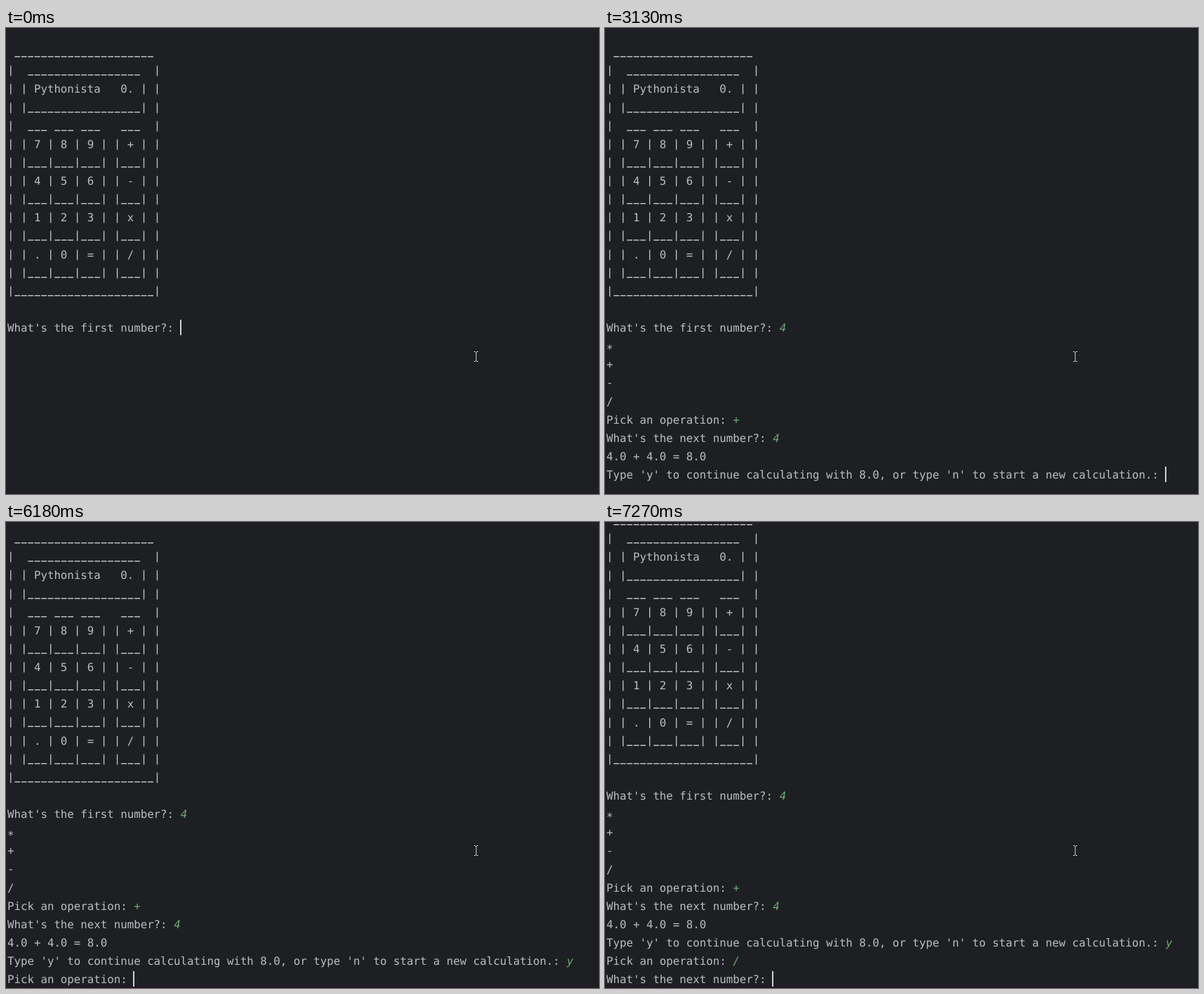
Animation of 845 by 663 pixels, one loop 8000 ms. Source, as an HTML page:

```html
<!DOCTYPE html>
<html lang="en">
<head>
<meta charset="utf-8">
<title>Console calculator</title>
<style>
  html, body { margin: 0; width: 100%; height: 100%; overflow: hidden; background: #1e1f22; }
  svg { display: block; width: 845px; height: 663px; }
  text {
    font: 15.76px "DejaVu Sans Mono", monospace;
    fill: #bcbec4;
    white-space: pre;
    text-rendering: geometricPrecision;
  }
  .typed { fill: #6aab73; font-style: italic; }
</style>
</head>
<body>
<svg viewBox="0 0 845 663">
  <rect width="845" height="663" fill="#1e1f22"/>
  <rect y="660" width="845" height="3" fill="#241a21"/>
  <g id="page"></g>
  <rect id="caret" width="2" height="22" fill="#ced0d6"/>
  <g fill="none">
    <path d="M666.5 460.5H669L670 461.5L671 460.5H673.5M670 461V474M666.5 474.5H669L670 473.5L671 474.5H673.5" stroke="#111214" stroke-width="2.6"/>
    <path d="M667 460.5H669L670 461.5L671 460.5H673M670 461V474M667 474.5H669L670 473.5L671 474.5H673" stroke="#e6e6e6"/>
  </g>
</svg>
<script>
const LOOP = 8000, CELL = 9.488, PITCH = 26.125, LEFT = 2;
const page = document.getElementById('page');
const caret = document.getElementById('caret');

const colX = col => LEFT + col * CELL;
const baseline = row => Math.round(432 + PITCH * (row - 16));

const keys = (a, b, c, op) => [`| | ${a} | ${b} | ${c} | | ${op} | |`, '| |___|___|___| |___| |'];
const art = [
  ' ' + '_'.repeat(21),
  '|  ' + '_'.repeat(17) + '  |',
  '| | Pythonista   0. | |',
  '| |' + '_'.repeat(17) + '| |',
  '|  ___ ___ ___   ___  |',
  ...keys(7, 8, 9, '+'),
  ...keys(4, 5, 6, '-'),
  ...keys(1, 2, 3, 'x'),
  ...keys('.', 0, '=', '/'),
  '|' + '_'.repeat(21) + '|'
];

// row, time shown, text, typed answer, time typed
const lines = [
  [16, 0, "What's the first number?: ", '4', 400],
  [17, 800, '*'],
  [18, 800, '+'],
  [19, 800, '-'],
  [20, 800, '/'],
  [21, 800, 'Pick an operation: ', '+', 1870],
  [22, 2400, "What's the next number?: ", '4', 2730],
  [23, 3130, '4.0 + 4.0 = 8.0'],
  [24, 3130, "Type 'y' to continue calculating with 8.0, or type 'n' to start a new calculation.: ", 'y', 4520],
  [25, 4990, 'Pick an operation: ', '/', 6870],
  [26, 7270, "What's the next number?: "]
];

// time, row, column; no row means hidden
const caretSteps = [
  [0, 16, 26], [400, 16, 27], [600, 17, 0], [800, 21, 19], [1730], [1870, 21, 20],
  [2250, 22, 0], [2400, 22, 25], [2730, 22, 26], [3130, 24, 84], [3730], [4190, 24, 84],
  [4520, 24, 85], [4990, 25, 19], [5710], [6180, 25, 19], [6720], [6870, 25, 20],
  [7110, 26, 0], [7270, 26, 25]
];
const scrollSteps = [[0, 0], [4990, 11], [7110, 37]];

const timed = [];

function add(tag, attrs, content = '') {
  const el = document.createElementNS('http://www.w3.org/2000/svg', tag);
  for (const name in attrs) el.setAttribute(name, attrs[name]);
  el.textContent = content;
  page.appendChild(el);
  return el;
}

function addText(row, col, str, start, cls = '') {
  const drop = str === '*' ? 3.5 : 0;
  const el = add('text', { x: colX(col), y: baseline(row) + drop, class: cls }, str);
  timed.push({ el, start });
}

function addArt(str, row) {
  const y = baseline(row);
  let bars = '', rules = '';
  [...str].forEach((ch, col) => {
    const x = colX(col);
    if (ch === '|') bars += `M${x + CELL / 2} ${y - 12.5}v14.7`;
    if (ch === '_') rules += `M${x + 0.8} ${y + 0.75}h${CELL - 1.6}`;
  });
  add('path', { d: bars + rules, stroke: '#bcbec4', 'stroke-width': 1.4, fill: 'none' });
  const label = str.replace(/[|_]/g, ' ').trimEnd();
  if (label) addText(row, 0, label, 0);
}

art.forEach((str, i) => addArt(str, i + 1));
for (const [row, start, str, answer, typedAt] of lines) {
  addText(row, 0, str, start);
  if (answer) addText(row, str.length, answer, typedAt, 'typed');
}

const stepAt = (steps, t) => steps.filter(s => s[0] <= t).pop();

function draw(t) {
  const scroll = stepAt(scrollSteps, t)[1];
  const [, row, col] = stepAt(caretSteps, t);
  page.setAttribute('transform', `translate(0 ${-scroll})`);
  for (const { el, start } of timed) el.style.display = t >= start ? '' : 'none';
  caret.style.display = row ? '' : 'none';
  if (row) {
    caret.setAttribute('x', Math.max(LEFT, Math.round(colX(col)) - 1));
    caret.setAttribute('y', baseline(row) - 17 - scroll);
  }
}

const begin = performance.now();
function tick() {
  draw((performance.now() - begin) % LOOP);
  requestAnimationFrame(tick);
}
tick();
</script>
</body>
</html>
```
